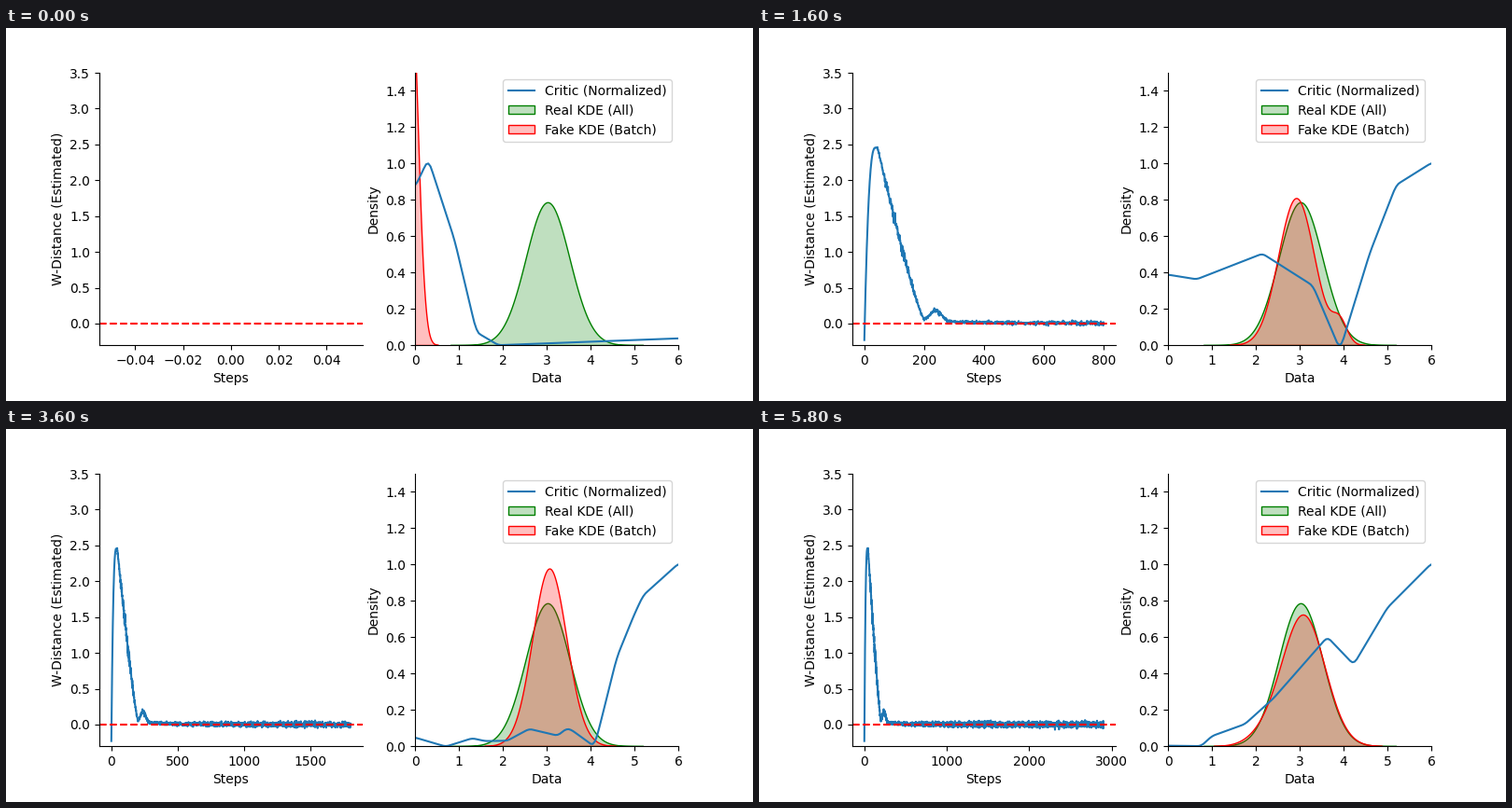
Recreate the animation shown at these times as a matplotlib script. Size 800x400 px, loop 6 s.

```python
import numpy as np
import matplotlib.pyplot as plt
from matplotlib.animation import FuncAnimation

FRAMES, STRIDE, INTERVAL = 30, 100, 200
BLUE = "#1f77b4"

# Corners of the critic's curve at a few training steps
CRITIC = {
    0: [(0, .86), (.3, 1.01), (.9, .57), (1.4, .07), (1.9, 0), (6, .037)],
    100: [(0, 0), (1, .06), (3, .7), (6, 1)],
    400: [(0, .07), (.7, .08), (1, .145), (1.4, .135), (2.4, -.01),
          (3.15, .175), (3.58, 0), (4.65, .87), (5.1, .95), (6, 1)],
    800: [(0, .39), (.65, .365), (2.15, .505), (3.3, .33), (3.92, -.02),
          (4.6, .51), (5.2, .88), (6, 1)],
    1500: [(0, .74), (.7, .67), (1.3, .66), (2.6, .42), (3.25, .14),
           (3.55, .11), (4.08, -.03), (4.6, .52), (5.2, .86), (6, 1)],
    2100: [(0, .005), (.7, .01), (1.6, .115), (2.1, .21), (3.45, .69),
           (4.17, .715), (5, .89), (6, 1)],
    2500: [(0, .07), (.7, 0), (1, .04), (1.6, .025), (2.6, .11), (3.35, .21),
           (4.2, .1), (5, .71), (5.4, .86), (6, 1)],
    2900: [(0, .007), (.75, .005), (1, .06), (1.75, .125), (2.4, .265),
           (3.63, .6), (4.23, .45), (5, .76), (6, 1)],
}

# Generated density as two bumps: height, centre, width of each
FAKE = {
    0: [(1, -.1, .16), (1, -.1, .16)],
    100: [(.8, 1.4, .25), (.8, 1.65, .25)],
    200: [(.6, 2.7, .35), (.5, 3.05, .35)],
    400: [(.68, 2.72, .28), (.62, 3.42, .27)],
    800: [(.81, 2.92, .41), (.12, 3.9, .17)],
    1500: [(.8, 3.15, .37), (.29, 2.45, .3)],
    2100: [(.73, 3, .44), (.14, 3.6, .38)],
    2500: [(.74, 2.95, .46), (.11, 3.6, .4)],
    2900: [(.72, 3.08, .49), (.05, 2.2, .4)],
}

grid = np.linspace(0, 6, 121)
dens_x = np.linspace(-.6, 5.4, 401)


def blend(keys, step, make):
    """Mix what make() gives for the keys on either side of step."""
    lo = max(k for k in keys if k <= step)
    hi = min(k for k in keys if k >= step)
    t = (step - lo) / max(hi - lo, 1)
    return (1 - t) * make(keys[lo]) + t * make(keys[hi])


def rounded(corners):
    xs, ys = zip(*corners)
    offsets = np.linspace(-.07, .07, 9)
    return np.mean([np.interp(grid + d, xs, ys) for d in offsets], axis=0)


def critic(step):
    y = blend(CRITIC, step, rounded)
    return (y - y.min()) / np.ptp(y)


def bump(x, height, centre, width):
    return height * np.exp(-.5 * ((x - centre) / width) ** 2)


def fake_density(step):
    return sum(bump(dens_x, *b) for b in blend(FAKE, step, np.array))


def outline(x, y):
    keep = y > 8e-4
    x, y = x[keep], y[keep]
    return np.column_stack([np.r_[x[0], x, x[-1]], np.r_[0, y, 0]])


def w_distance(s):
    """Steep rise, near-linear fall, small rebound, then noise about zero."""
    rise = 2.69 * (1 - np.clip(1 - s / 38, 0, 1) ** 2.7) - .28
    fall = np.clip(1 - (s - 44) / 156, 0, 1) ** 1.15
    w = rise * fall + bump(s, .16, 238, 20) + .05 * np.exp(-s / 350)
    amp = .02 * (1 - np.exp(-s / 500))
    amp += .045 * np.clip((s - 40) / 40, 0, 1) * np.clip(w, 0, 1)
    return w + amp * np.random.default_rng(7).normal(size=s.size)


steps = np.arange(FRAMES * STRIDE)
wdist = w_distance(steps)

fig, (left, right) = plt.subplots(1, 2, figsize=(8, 4), dpi=100)
fig.subplots_adjust(left=.125, right=.9, bottom=.15, top=.88, wspace=.2)
for ax in (left, right):
    ax.spines[["top", "right"]].set_visible(False)

w_line, = left.plot([], [], color=BLUE)
left.axhline(0, color="red", linestyle="--")
left.set(ylim=(-.3, 3.5), xlabel="Steps", ylabel="W-Distance (Estimated)")


def shade(x, y, color, label):
    return right.fill_between(x, y, facecolor=(color, .25), edgecolor=color,
                              linewidth=1, label=label)


c_line, = right.plot([], [], color=BLUE, label="Critic (Normalized)")
real_x = np.linspace(.8, 5.2, 200)
shade(real_x, bump(real_x, .787, 3.02, .5), "green", "Real KDE (All)")
fake_fill = shade(dens_x, fake_density(0), "red", "Fake KDE (Batch)")
right.set(xlim=(0, 6), ylim=(0, 1.5), xlabel="Data", ylabel="Density")
right.set_xticks(range(7))
right.legend(loc="upper right")


def update(i):
    step = i * STRIDE
    w_line.set_data(steps[:step + 1], wdist[:step + 1])
    pad = .05 * step or .055
    left.set_xlim(-pad, step + pad)
    c_line.set_data(grid, critic(step))
    fake_fill.set_verts([outline(dens_x, fake_density(step))])
    return w_line, c_line, fake_fill


anim = FuncAnimation(fig, update, frames=FRAMES, interval=INTERVAL,
                     repeat=True, repeat_delay=0)
plt.show()
```
